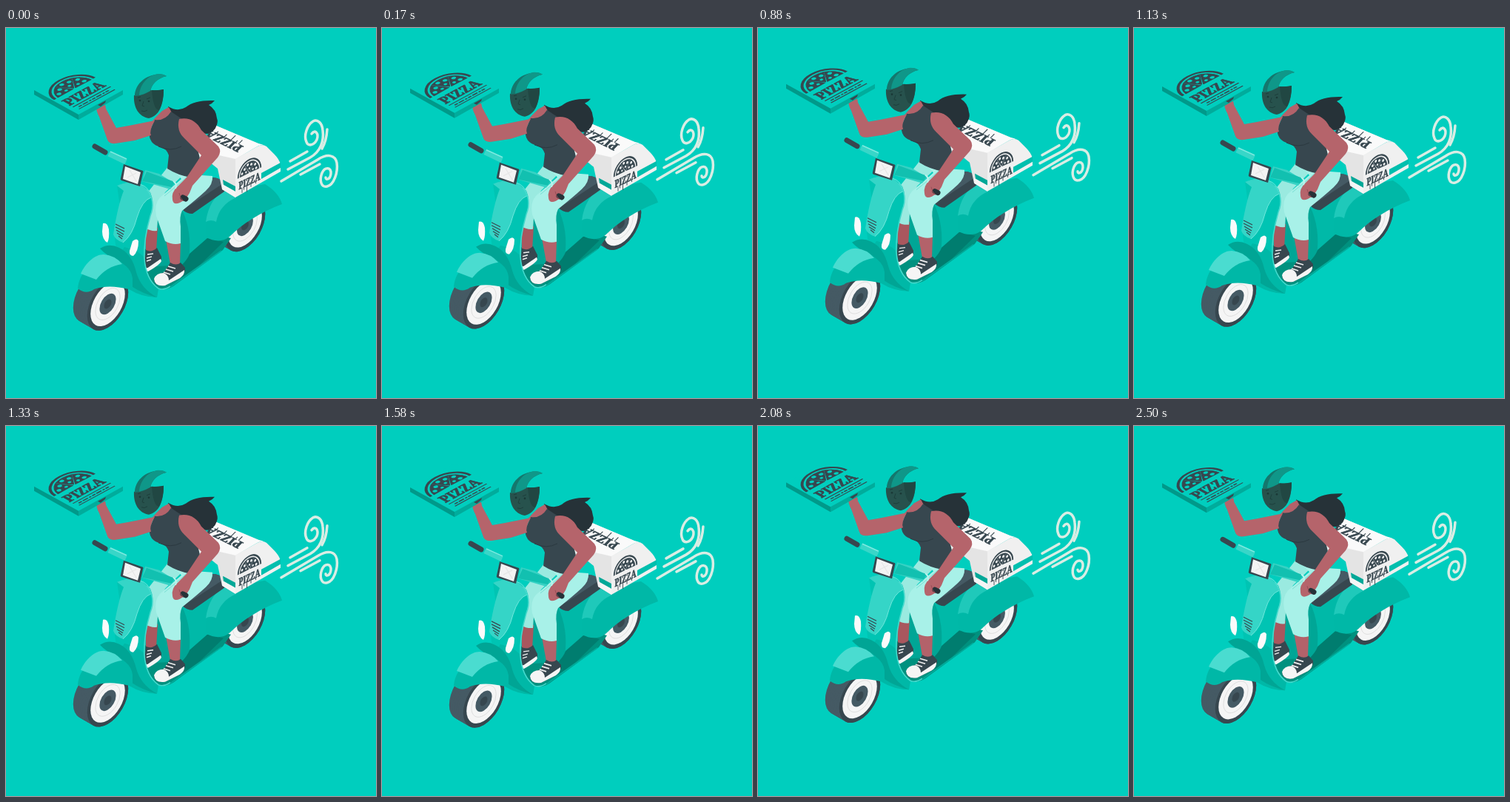
Write an HTML page that moves like this. It is 500 px wide and 500 px high and loops after 2540 ms.

```html
<!DOCTYPE html>
<html lang="en">
<head>
<meta charset="utf-8">
<title>Pizza delivery scooter</title>
<style>
html, body { margin: 0; width: 100%; height: 100%; overflow: hidden; background: #00cebe; }
svg { display: block; width: 100vw; height: 100vh; }
text { font-family: "Noto Serif", "Liberation Serif", serif; font-weight: 900; }
</style>
</head>
<body>
<svg viewBox="0 0 500 500" xmlns="http://www.w3.org/2000/svg">
<g id="rider">
  <g id="wind" fill="none" stroke="#d9ede4" stroke-width="3.5" stroke-linecap="round">
    <path d="M384 180L407 167"/>
    <path d="M381 191L411 175C425 167 430 153 428 138C427 128 421 123 415 126C407 131 402 145 406 154C408 160 416 159 420 151C423 143 418 136 413 143"/>
    <path d="M434 137Q433 153 427 163"/>
    <path d="M398 198L424 184"/>
    <path d="M372 207L421 178C435 169 445 172 447 182C449 195 443 212 434 214C426 216 423 206 427 196C431 187 440 188 439 197C438 205 432 206 432 202"/>
  </g>

  <g id="rear"></g>

  <!-- floor and body -->
  <path d="M186 300Q188 340 205 352Q214 356 226 349L293 300L304 284L272 276L243 300L205 290Z" fill="#00917f"/>
  <path d="M190 262L205 240L240 235L252 262L250 305L240 320L205 322L189 320Z" fill="#00a696"/>
  <path d="M238 246L294 215L300 232L274 284L247 311Q252 276 238 246Z" fill="#00b9a8"/>
  <path d="M236 322Q246 312 248 305L272 284L294 289L262 320L238 337Z" fill="#007d6f"/>

  <!-- rear cowl -->
  <path d="M271 283C268 255 276 232 296 220L350 211C364 219 371 230 373 238C344 249 320 264 302 282C292 290 280 288 271 283Z" fill="#00b8a7"/>
  <path d="M270 262C273 240 283 226 294 220L311 229C296 236 287 246 284 262Q277 258 270 262Z" fill="#1fc9ba"/>

  <!-- seat -->
  <path d="M238 243L274 204Q284 199 295 209L295 221L252 251Q244 251 238 245Z" fill="#37474f"/>
  <path d="M240 241L274 204Q284 199 295 209L251 238Q245 242 240 241Z" fill="#455a64"/>

  <!-- delivery box -->
  <path d="M255 165L284 132L343 157L310 178L310 229L292 218L286 190Z" fill="#e4e4e4"/>
  <path d="M310 177L338 161Q346 156 352 160L362 170Q369 177 371 184L371 194L310 229Z" fill="#f0f0f0"/>
  <path d="M284 132L341 156Q346 157 350 159Q344 157 338 161L310 177L257 165Z" fill="#fafafa"/>
  <path d="M345 196L371 182L371 189L345 204Z" fill="#00bfae"/>
  <path d="M293 205L310 214L310 221L294 212Z" fill="#00a898"/>
  <path d="M292 211L310 221V229L292 218Z" fill="#f5f5f5"/>
  <g id="sideLogo"></g>
  <g id="lidLogo"></g>

  <!-- far leg -->
  <path d="M188 268L205 270L203 302Q196 307 189 302Z" fill="#a9575e"/>
  <path d="M220 186L244 194L215 222L206 243L204 274Q196 275 187 270L188 236Q188 225 198 214Z" fill="#9aeae0"/>
  <path d="M189 300Q197 304 204 297L210 309Q211 315 204 321L191 329Q186 328 187 319Z" fill="#37474f"/>
  <path d="M187 319Q189 327 193 323L209 312L210 315Q208 320 192 329Q186 329 187 319Z" fill="#f5f5f5"/>
  <path d="M190 311L197 309M190 315L196 313M191 306L199 305" stroke="#f0f0f0" stroke-width="1.4"/>

  <!-- near leg -->
  <path d="M216 286L236 290L235 320Q228 325 222 319Z" fill="#b3626a"/>
  <path d="M222 187L250 198L279 200Q280 211 270 220Q258 231 238 247Q234 255 236 268L236 291Q226 294 215 288L203 254Q200 238 208 229L237 204Z" fill="#a8f1e8"/>
  <path d="M246 200Q228 216 214 227" fill="none" stroke="#7adfd3" stroke-width="1"/>
  <path d="M222 317Q230 322 236 317L242 324Q243 331 235 338L215 348Q201 350 200 340Q203 333 214 330Z" fill="#37474f"/>
  <path d="M200 339Q203 331 213 331Q220 334 220 341L241 327Q242 333 235 338L215 348Q201 350 200 339Z" fill="#f5f5f5"/>
  <path d="M213 330L222 333M216 326L226 329M219 322L229 325" stroke="#f0f0f0" stroke-width="1.7"/>

  <!-- front apron -->
  <path d="M150 213Q178 204 195 222Q201 235 195 254Q187 282 187 310Q189 339 206 352L204 364Q184 361 171 350L150 310L147 284L160 284Z" fill="#00c4b3"/>
  <path d="M160 296Q178 300 187 310Q189 339 206 352L204 364Q184 361 167 351L150 312Z" fill="#00b8a7"/>
  <path d="M127 298Q139 290 153 297Q170 305 176 330Q182 352 204 364Q184 362 171 350Q169 322 150 313Q136 308 127 298Z" fill="#00a595"/>
  <path d="M150 213Q165 207 181 211Q193 217 196 229Q184 233 177 256Q171 280 158 290Q147 286 145 279Q151 240 159 220Z" fill="#35d5c7"/>
  <path d="M181 211Q194 215 196 229Q184 233 177 256Q171 280 158 290" fill="none" stroke="#70e8dd" stroke-width="1"/>
  <path d="M190 218Q203 234 195 254Q186 285 187 311Q189 340 206 352Q213 355 222 349" fill="none" stroke="#43d9cc" stroke-width="1.6"/>
  <path d="M222 350L291 301" stroke="#00ad9d" stroke-width="1.6"/>
  <path d="M148 265L160 271M148 269L160 275M149 273L159 279M150 277L158 282M152 281L157 285" stroke="#37474f" stroke-width="1.2"/>
  <path d="M131 264Q137 262 139 272Q140 284 137 290Q130 286 130 275Z" fill="#fafafa"/>
  <path d="M171 288Q177 283 179 288Q179 302 172 308Q166 308 167 301Z" fill="#fafafa"/>

  <!-- handlebar -->
  <path d="M152 212L176 205L205 213L222 218L228 210L207 197L188 192L184 207Z" fill="#36d2c4"/>
  <path d="M190 194L228 208L224 215L184 207Z" fill="#12c0b0"/>
  <path d="M139 170L162 181" stroke="#38d6c8" stroke-width="7"/>
  <path d="M141 167L163 177" stroke="#7deae0" stroke-width="1.6"/>
  <path d="M120 160L134 168" stroke="#37474f" stroke-width="7" stroke-linecap="round"/>
  <path d="M159 184L185 193Q186 194 185 196L181 214L156 206Q154 205 155 203Z" fill="#37474f"/>
  <path d="M161 187L182 195L178 211L158 204Z" fill="#f3f3f3"/>
  <path d="M167 192L176 207M164 202L176 196" stroke="#e6e6e6" stroke-width="1.2"/>

  <!-- front wheel and fender -->
  <g id="front"></g>
  <path d="M97 352C99 330 117 313 140 312Q168 318 171 338L171 350Q185 359 204 364Q184 364 166 353Q138 346 119 353Q108 361 97 352Z" fill="#00b8a7"/>
  <path d="M101 332C108 317 120 306 132 306Q147 307 157 319Q136 322 122 340Z" fill="#4adcd0"/>

  <!-- hair -->
  <path d="M219 106Q232 114 243 107Q255 97 282 98Q279 102 274 104Q284 110 285 122Q287 127 284 133Q282 140 272 143L260 142L236 130L221 121Z" fill="#263238"/>

  <!-- neck and torso -->
  <path d="M202 121L211 112L220 107L225 116L222 126L205 134L197 127Z" fill="#b3626a"/>
  <path d="M201 124Q215 126 223 113L238 123L256 150L264 170L250 202Q232 199 218 190L220 172Q217 163 209 161Q201 159 197 154Q192 147 195 138Z" fill="#37474f"/>
  <path d="M206 160Q222 168 237 160" fill="none" stroke="#2b3940" stroke-width="1"/>

  <!-- raised arm -->
  <path d="M201 125L166 132L149 135L135 109Q135 103 130 101L122 106Q122 113 126 120L137 151Q139 157 148 156L174 152L196 145Q193 139 201 125Z" fill="#b5646b"/>

  <!-- near arm -->
  <path d="M258 160L268 173L262 176Z" fill="#edf2f0"/>
  <path d="M234 123C247 120 258 126 264 138L287 160Q292 167 286 175L252 213L248 223Q243 232 235 236Q226 240 225 232Q223 222 232 214L244 202L264 172L241 149Q230 139 234 123Z" fill="#b5646b"/>
  <path d="M239 229L243 231" stroke="#263238" stroke-width="7" stroke-linecap="round"/>
  <path d="M229 217Q232 211 226 207" fill="none" stroke="#baf3ec" stroke-width="2"/>
  <path d="M234 223Q235 230 240 234" fill="none" stroke="#984c56" stroke-width="1"/>

  <!-- helmet -->
  <path d="M173 91C172 108 180 120 193 122C207 119 213 104 213 83Q201 85 195 84Q184 91 173 91Z" fill="#27524d"/>
  <path d="M197 84Q207 85 213 83Q213 99 207 111Q199 111 197 84Z" fill="#214743"/>
  <path d="M174 92C174 77 187 65 202 63Q211 61 217 65C204 68 197 76 195 85Q184 92 174 92Z" fill="#14776d"/>
  <path d="M180 91C181 75 193 63 206 62Q213 62 217 65C204 68 197 76 195 85Q188 89 180 91Z" fill="#0f9789"/>
  <path d="M178 94L182 93M190 96L195 94M186 99L184 105L187 106M183 112Q187 114 191 111" fill="none" stroke="#1d3f3c" stroke-width="1"/>
  <circle cx="181" cy="98" r="1.3" fill="#1a3836"/><circle cx="193" cy="99" r="1.3" fill="#1a3836"/>

  <!-- carried box -->
  <path d="M38 84L98 51L158 84L98 117Z" fill="#00cebe"/>
  <path d="M38 84L98 117V124L38 90Z" fill="#00998a"/>
  <path d="M98 117L158 84V90L98 124Z" fill="#00ac9c"/>
  <path d="M124 104L135 98L134 101L128 106Z" fill="#37474f"/>
  <g id="topLogo"></g>
</g>
</svg>
<script>
const LOOP = 2540, STEPS = 61, BOB = 1500, LIFT = 10;
const INK = '#37474f';
const el = id => document.getElementById(id);
const circle = (r, fill, x = 0, y = 0, more = '') =>
  `<circle cx="${x}" cy="${y}" r="${r}" fill="${fill}" ${more}/>`;

// Isometric wheel: tread first, then the outer face
function wheel(id, cx, cy, r, dx, dy) {
  const at = (x, y, inner) => `<g transform="matrix(.866 -.5 0 1 ${x} ${y})">${inner}</g>`;
  let tread = '';
  for (let i = 0; i <= 12; i++) tread += at(cx - dx * (1 - i / 12), cy - dy * (1 - i / 12), circle(r, '#455a64'));
  el(id).innerHTML = tread + at(cx, cy,
    circle(r, INK) + circle(r * .84, '#f5f5f5') +
    circle(r * .6, 'none', 0, 0, 'stroke="#d9d9d9" stroke-width=".8"') +
    circle(r * .4, '#455a64') + circle(r * .18, INK));
}

// Half pizza with lettering, centred on the flat side of the pizza
function logo(id, matrix, paper, { dome = true, drips = false, lines = false }) {
  let s = '';
  if (dome) {
    s += `<g transform="scale(1.13 .88)"><path d="M-27 0A27 27 0 0 1 27 0" fill="none" stroke="${INK}" stroke-width="3.2"/>`;
    for (let i = 0; i < 3; i++) {
      s += `<g transform="rotate(${i * 60 - 60})"><path d="M0 -2L-11 -20Q0 -25 11 -20Z" fill="${INK}" stroke="${INK}" stroke-linejoin="round"/>` +
        circle(2.6, paper, -4, -18) + circle(2.6, paper, 4.5, -16) + circle(2, paper, 0, -9.5) + '</g>';
    }
    s += '</g>';
  }
  s += `<text x="0" y="20.5" text-anchor="middle" font-size="18.5" fill="${INK}" stroke="${INK}" stroke-width=".8">PIZZA</text>`;
  if (drips) {
    for (const [x, h] of [[-20, 9], [-15, 5], [-7, 11], [4, 6], [17, 4]])
      s += `<path d="M${x} 20v${h}" stroke="${INK}" stroke-width="1.3"/>`;
  }
  if (lines) {
    s += `<path d="M-28 25H31M-26 32.5H30" stroke="${INK}" stroke-width="1.3"/>` +
      `<path d="M-23 29H25" stroke="${INK}" stroke-width="1.8" stroke-dasharray="5 1.5 8 2 3 1.5"/>`;
  }
  el(id).innerHTML = `<g transform="matrix(${matrix})">${s}</g>`;
}

wheel('rear', 323, 267, 31.5, 14, 8);
wheel('front', 137.5, 373, 32, 19, 11);
logo('topLogo', '.866 -.47 .866 .47 93 82', '#00cebe', { lines: true });
logo('sideLogo', '.5 -.24 0 .76 329 196', '#f0f0f0', { drips: true });
logo('lidLogo', '-.8 -.4 .6 -.6 286 161', '#fafafa', { dome: false, drips: true });

const rider = el('rider');
function draw() {
  const t = performance.now() % LOOP;
  const step = Math.min(STEPS - 1, Math.floor((t + 6) * STEPS / LOOP));
  const p = (step * 1000 / 24 % BOB) / BOB;
  const y = -LIFT * (1 - Math.abs(1 - 2 * p));
  rider.setAttribute('transform', `translate(0 ${y.toFixed(3)})`);
  requestAnimationFrame(draw);
}
draw();
</script>
</body>
</html>
```
